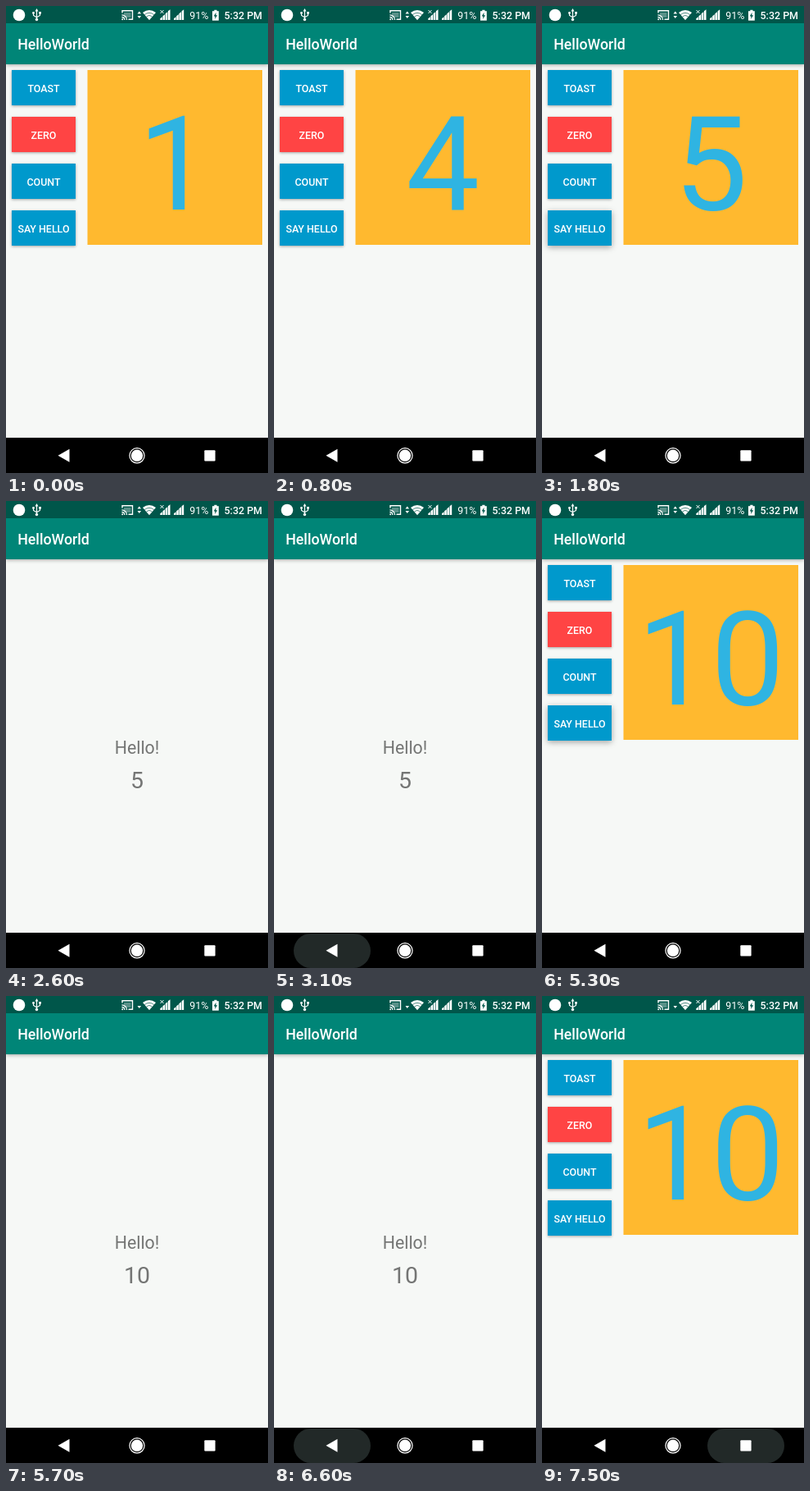
An HTML page with a canvas for the animation above (7.6 s loop, 320 px wide and 569 px high).

```html
<!DOCTYPE html>
<html lang="en">
<head>
<meta charset="utf-8">
<title>HelloWorld</title>
<style>
  html, body { margin: 0; width: 100%; height: 100%; overflow: hidden; background: #000; }
  canvas { display: block; width: 320px; height: 569px; }
</style>
</head>
<body>
<canvas id="stage" width="320" height="569"></canvas>
<script>
const c = document.getElementById('stage').getContext('2d');
const LOOP = 7600, STEP = 100, W = 320, H = 569, NAV_TOP = 526;
const FONT = 'Roboto, "Noto Sans", sans-serif';

// Times at which the counter goes up, starting from 1
const COUNTS = [200, 500, 700, 1000, 3800, 4000, 4200, 4400, 4600];
const VISITS = [
  { press: 1700, open: 2050, back: 2900, close: 3150 },
  { press: 5000, open: 5350, back: 6500, close: 6750 }
];
const BUTTONS = [
  ['TOAST', 78, '#0099cc'],
  ['ZERO', 135, '#ff4444'],
  ['COUNT', 192, '#0099cc'],
  ['SAY HELLO', 249, '#0099cc']
];

const clamp = x => Math.max(0, Math.min(1, x));
const pulse = (t, from, to, fade) => Math.min(clamp((t - from) / fade), clamp((to - t) / fade));

function box(x, y, w, h, color) {
  c.fillStyle = color;
  c.fillRect(x, y, w, h);
}

function poly(color, ...p) {
  c.fillStyle = color;
  c.beginPath();
  for (let i = 0; i < p.length; i += 2) c.lineTo(p[i], p[i + 1]);
  c.fill();
}

function line(width, ...p) {
  c.strokeStyle = '#fff';
  c.lineWidth = width;
  c.beginPath();
  for (let i = 0; i < p.length; i += 2) c.lineTo(p[i], p[i + 1]);
  c.stroke();
}

function disc(x, y, r, color = '#fff') {
  c.fillStyle = color;
  c.beginPath();
  c.arc(x, y, r, 0, 7);
  c.fill();
}

function arc(x, y, r, from, to, width) {
  c.strokeStyle = '#fff';
  c.lineWidth = width;
  c.beginPath();
  c.arc(x, y, r, from, to);
  c.stroke();
}

function text(s, x, y, size, color, weight = 400, align = 'center') {
  c.font = `${weight} ${size}px ${FONT}`;
  c.textAlign = align;
  c.fillStyle = color;
  c.fillText(s, x, y);
}

function raised(x, y, w, h, color, depth) {
  c.save();
  c.shadowColor = 'rgba(0,0,0,.34)';
  c.shadowBlur = depth * 2;
  c.shadowOffsetY = depth * 0.6;
  box(x, y, w, h, color);
  c.restore();
}

function windowBase() {
  box(0, 0, W, H, '#f6f8f6');
  raised(0, 21, W, 50, '#008577', 2.2);
  box(0, 0, W, 21, '#00564a');
  text('HelloWorld', 14.2, 53, 17.78, '#fff', 500, 'left');
}

function mainScreen(t, count) {
  windowBase();
  const lift = [0, 0, 0, 0];
  for (const at of COUNTS) lift[2] = Math.max(lift[2], pulse(t, at - 200, at + 100, 100));
  for (const v of VISITS) lift[3] = Math.max(lift[3], pulse(t, v.press - 50, v.open + 150, 100));
  BUTTONS.forEach(([label, y, color], i) => {
    raised(7, y, 78, 43, color, 1.6 + 2 * lift[i]);
    text(label, 46, y + 26.5, 12.44, '#fff', 500);
  });
  box(99.5, 78, 213.5, 213, '#ffb92f');
  text(count, 206.2, 248, 160, '#2fb4e2');
}

function helloScreen(count) {
  windowBase();
  text('Hello!', 160, 307.5, 21.33, '#747574');
  text(count, 160, 349.7, 28.44, '#747574');
}

// Opacity and drop of the upper window
function helloPose(t) {
  const v = VISITS.find(v => t >= v.open && t < v.close + 250);
  if (!v) return null;
  if (t < v.close) {
    const p = clamp((t - v.open) / 350);
    return { alpha: clamp((t - v.open) / 200), y: 45 * Math.pow(1 - p, 5) };
  }
  const p = clamp((t - v.close) / 250);
  return { alpha: 1 - clamp((t - v.close - 100) / 150), y: 45 * Math.pow(p, 2) };
}

function signal(x, level) {
  for (let i = 0; i < 4; i++) {
    const h = 3 + i * 3;
    poly('#fff', x + i * 3.2, 17, x + i * 3.2, 17.3 - h + 1,
      x + i * 3.2 + 2.6, 16.3 - h, x + i * 3.2 + 2.6, 17);
  }
}

function usb() {
  line(1.2, 37.5, 5, 37.5, 16);
  poly('#fff', 35.5, 6.5, 37.5, 3, 39.5, 6.5);
  line(1.1, 33.5, 9, 33.5, 11.5, 37.5, 13.8, 41.5, 11.5, 41.5, 8);
  disc(33.5, 8.5, 1.4);
  box(40.2, 7, 2.7, 2.7, '#fff');
  disc(37.5, 16.5, 1.7);
}

function cast() {
  line(1.4, 142, 8.5, 142, 5.8, 154.5, 5.8, 154.5, 16.2, 149.5, 16.2);
  box(144, 8, 8.5, 6, 'rgba(255,255,255,.35)');
  for (const r of [3.5, 6.2]) arc(141.4, 17, r, -Math.PI / 2, 0, 1.3);
  disc(142.2, 16.2, 1);
}

function wifi() {
  c.fillStyle = '#fff';
  c.beginPath();
  c.moveTo(175, 17.3);
  c.lineTo(167, 8);
  c.quadraticCurveTo(175, 1.8, 183, 8);
  c.fill();
  for (const r of [5.2, 8.6]) {
    c.strokeStyle = '#00564a';
    c.lineWidth = 0.7;
    c.beginPath();
    c.arc(175, 17, r, -2.3, -0.84);
    c.stroke();
  }
}

function statusBar(t) {
  disc(16, 11, 7.3);
  usb();
  cast();
  if (t < 5700) poly('#fff', 160.5, 9.5, 162.8, 6.5, 165.1, 9.5);
  poly('#fff', 160.5, 12, 162.8, 15, 165.1, 12);
  wifi();
  signal(188.3);
  line(1, 188.5, 5, 192.5, 9);
  line(1, 192.5, 5, 188.5, 9);
  signal(205);
  text('91%', 224.3, 15.5, 12.44, '#fff', 400, 'left');
  box(252, 6.2, 7.8, 11.5, '#fff');
  box(254.3, 4.8, 3.2, 2, '#fff');
  poly('#00564a', 256.6, 7.8, 253.7, 12.6, 255.5, 12.6, 255.1, 16, 258.1, 11.2, 256.3, 11.2);
  text('5:32 PM', 313, 15.5, 12.44, '#fff', 500, 'right');
}

function navPress(x, amount) {
  if (amount <= 0) return;
  const w = 94 * (0.75 + 0.25 * amount);
  c.fillStyle = `rgba(40,49,47,${0.85 * amount})`;
  c.beginPath();
  c.roundRect(x - w / 2, 527, w, 42, 21);
  c.fill();
}

function navBar(t) {
  box(0, NAV_TOP, W, H - NAV_TOP, '#000');
  for (const v of VISITS) navPress(71, pulse(t, v.back - 100, v.back + 700, 200));
  navPress(249, clamp((t - 7300) / 200));
  poly('#fff', 63.5, 547.8, 77.5, 539.8, 77.5, 555.8);
  disc(160, 547.8, 7.2);
  arc(160, 547.8, 9.1, 0, 7, 1.2);
  c.fillStyle = '#fff';
  c.beginPath();
  c.roundRect(242.3, 541.2, 13.3, 13.3, 1);
  c.fill();
}

function draw(t) {
  const count = 1 + COUNTS.filter(at => t >= at).length;
  const pose = helloPose(t);
  mainScreen(t, count);
  if (pose) {
    c.save();
    c.globalAlpha = pose.alpha;
    c.translate(0, pose.y);
    helloScreen(count);
    c.restore();
  }
  statusBar(t);
  navBar(t);
}

const start = performance.now();
function frame() {
  const t = (performance.now() - start) % LOOP;
  draw(Math.floor(t / STEP) * STEP);
  requestAnimationFrame(frame);
}
frame();
</script>
</body>
</html>
```
